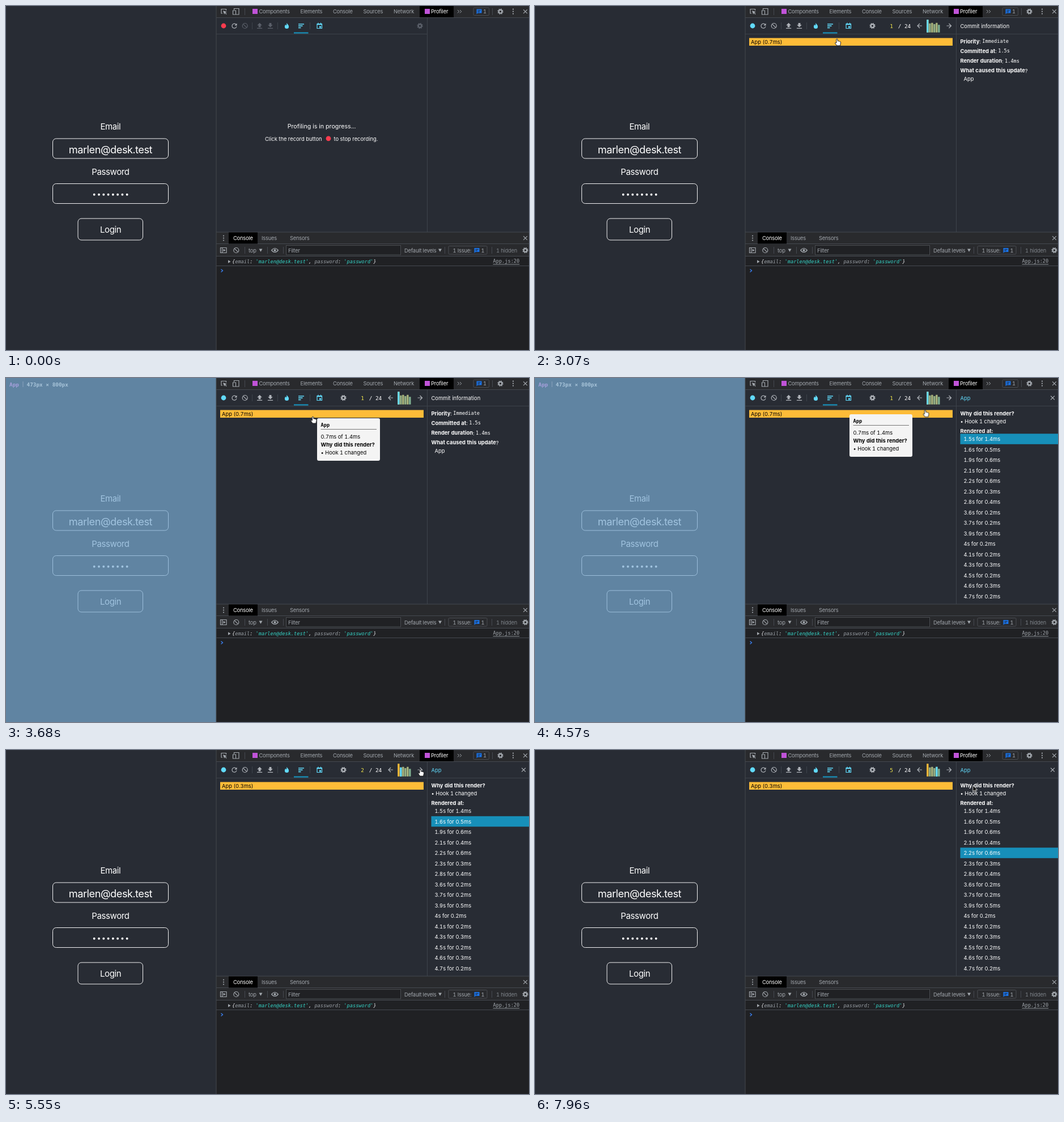
An HTML page for the animation above (8000 ms loop, 923x607 px).

```html
<!DOCTYPE html>
<html lang="en">
<head>
<meta charset="utf-8">
<title>Profiling a login form</title>
<style>
  html, body { margin: 0; width: 100%; height: 100%; overflow: hidden; background: #282c34; }
  svg { display: block; width: 923px; height: 607px; }
  text { font: 9.35px Inter, sans-serif; font-variant-numeric: tabular-nums; dominant-baseline: central; fill: #fff; white-space: pre; }
  .form text { font-size: 15px; letter-spacing: -.025em; text-anchor: middle; }
  .form text.value { font-size: 18.2px; }
  .form rect { fill: none; stroke: #f0f0f1; }
  .chrome text { font-size: 9.3px; letter-spacing: -.02em; fill: #a2a7ad; }
  .chrome text.on { fill: #fff; }
  text.mono, .chrome text.mono, .mono { font-family: "DejaVu Sans Mono", monospace; font-size: 8.63px; font-weight: 400; letter-spacing: 0; }
  text.big { font-size: 9.4px; }
  text.bold { font-weight: 700; }
  text.cyan { fill: #61dafb; }
  .chrome text.log { font-style: italic; fill: #e8eaed; }
  .log .key { fill: #9aa0a6; }
  .log .string { fill: #35d4c7; }
  .ink text { fill: #000; }
  .line { fill: none; stroke: currentColor; stroke-width: 1.2; }
  .fill { fill: currentColor; }
  .rule { stroke: #454950; }
  .grey { color: #a2a7ad; }
  .dim { color: #5b606a; }
  .lit { color: #afb3b9; }
  .blue { color: #61dafb; }
</style>
</head>
<body>
<svg viewBox="0 0 923 607">
  <defs>
    <g id="gear" class="line">
      <circle r="2.8" stroke-width="2.2"/>
      <circle r="4.3" stroke-width="1.7" stroke-dasharray="1.69"/>
    </g>
    <path id="cross" class="line" d="M-3.4-3.4 3.4 3.4M3.4-3.4-3.4 3.4"/>
    <g id="dots" class="fill"><circle cy="-4" r="1.1"/><circle r="1.1"/><circle cy="4" r="1.1"/></g>
    <path id="caret" class="fill" d="M-3-2.4H3L0 2.8Z"/>
    <g id="ban" class="line"><circle r="4.5"/><path d="M-3.2-3.2 3.2 3.2"/></g>
    <path id="thick-arrow" class="fill" d="M0-5.2 4.3-.8H1.9V2.4H-1.9V-.8H-4.3Z"/>
    <g id="reload">
      <path class="line" d="M3.2-2.2A4 4 0 1 0 3.9 1"/>
      <path class="fill" d="M4.5-4.6V-.6H.5Z"/>
    </g>
    <path id="arrow" class="line" d="M-4 0H4M0-4 4 0 0 4"/>
    <g id="note">
      <path fill="#1a73e8" d="M-4.5-4H4.5V3H-2.4L-4.5 5Z"/>
      <path stroke="#202124" d="M-2.6-1.6H2.6M-2.6.8H1"/>
    </g>
    <g id="tools">
      <use href="#ban" x="421.7" y="35"/>
      <use href="#thick-arrow" x="447.6" y="35"/>
      <use href="#thick-arrow" transform="translate(466.5 32.4) scale(1 -1)"/>
      <path class="line" d="M443 39.4H452.2M461.9 39.4H471.1"/>
    </g>
  </defs>

  <rect width="923" height="607" fill="#282c34"/>

  <g class="form">
    <text x="184.4" y="212.5">Email</text>
    <rect x="82.5" y="234" width="204" height="35" rx="6"/>
    <text class="value" x="184.4" y="252.5">marlen@desk.test</text>
    <text x="184.4" y="292.5">Password</text>
    <rect x="82.5" y="313.5" width="204" height="35" rx="6"/>
    <path d="M155.7 332.8H215" stroke="#fff" stroke-width="3.9" stroke-linecap="round" stroke-dasharray="0 8.28"/>
    <rect x="127" y="375" width="114.5" height="38" rx="6"/>
    <text x="184.6" y="394.8">Login</text>
  </g>

  <g data-show="3160 4660">
    <rect width="371" height="607" fill="rgba(120,170,210,.7)"/>
    <text class="mono big" x="6" y="11" style="fill:#a6a0dc;font-weight:700">App</text>
    <path d="M30 6V16" stroke="#8ba6bf"/>
    <text class="mono big" x="36.5" y="11" style="fill:#a9c5da;font-weight:700">473px × 800px</text>
  </g>

  <!-- Top tab bar -->
  <g class="chrome grey">
    <rect x="371" width="552" height="20.5" fill="#292a2d"/>
    <path class="rule" d="M371 20.5H923M421.5 4V16M858.5 4V16"/>
    <path class="line" d="M382 13H380V5.5H388.5V8"/>
    <path class="fill" d="M383 8 390 10.6 387.2 11.5 389.6 14 388.6 15 386.2 12.5 385.2 15Z"/>
    <path class="line" d="M402.5 7V4.5H411V15H406M400.5 8H405.5V15H400.5Z"/>
    <rect x="435" y="5" width="9" height="9" fill="#c053d8"/>
    <text x="446.5" y="9.8">Components</text>
    <text x="519.5" y="9.8">Elements</text>
    <text x="577" y="9.8">Console</text>
    <text x="630.5" y="9.8">Sources</text>
    <text x="684" y="9.8">Network</text>
    <rect x="730" width="60" height="20" fill="#000"/>
    <rect x="739" y="5" width="9" height="9" fill="#c053d8"/>
    <text class="on" x="750" y="9.8">Profiler</text>
    <path class="line" d="M797 7 799.7 9.7 797 12.4M801 7 803.7 9.7 801 12.4" style="stroke-width:1"/>
    <rect x="825" y="3" width="27.5" height="13.5" rx="1.5" fill="none" stroke="#4a4d52"/>
    <use href="#note" x="835" y="9.5"/>
    <text x="842" y="9.8">1</text>
    <use href="#gear" x="872.5" y="9.7"/>
    <use href="#dots" x="895" y="9.7"/>
    <use href="#cross" x="916.5" y="9.7"/>
  </g>

  <!-- Profiler toolbar -->
  <path d="M371 49.5H743.5M743.5 21V399M434.5 29V41M479.5 29V41M536.5 29V41" stroke="#3d424a"/>
  <use href="#reload" class="lit" x="403" y="35"/>
  <g class="blue">
    <path class="fill" transform="translate(495.5 35)" d="M-.3-5C1.3-3 3.7-1.5 3.6 1.5A3.6 3.6 0 0 1-3.6 1.5C-3.6 0-2.8-1.7-2-2.4Q-1.9-.9-1-.8Q.3-2-.3-5Z"/>
    <path class="line" d="M516 32H526M516 35.2H523.5M516 38.4H520.5" style="stroke-width:1.7"/>
    <path class="line" d="M549 31.5H557.5V39.5H549ZM549 32.6H557.5M551 29.5V31M555.5 29.5V31"/>
    <rect class="fill" x="553" y="35.5" width="3" height="3"/>
  </g>
  <rect x="508" y="46.3" width="25.5" height="2.2" fill="#178fb9"/>

  <g data-show="0 2270">
    <circle cx="384" cy="35" r="4.4" fill="#ff3b4e"/>
    <use href="#tools" class="dim"/>
    <use href="#gear" class="dim" x="730.5" y="35"/>
    <text x="557" y="212" text-anchor="middle" style="font-size:10.7px">Profiling is in progress...</text>
    <text x="457" y="234">Click the record button</text>
    <circle cx="569" cy="233.8" r="4.4" fill="#ff3b4e"/>
    <text x="578.5" y="234">to stop recording.</text>
  </g>

  <g data-show="2270 8000">
    <circle cx="384" cy="35" r="4.4" fill="#61dafb"/>
    <g class="lit">
      <use href="#tools"/>
      <use href="#gear" x="595.5" y="35"/>
      <use href="#arrow" transform="translate(679 35) scale(-1 1)"/>
      <use href="#arrow" x="730.5" y="35"/>
    </g>
    <path d="M744 49.5H923" stroke="#3d424a"/>
    <text class="mono big" x="640.7" y="35.2">/ 24</text>
    <rect x="378" y="56.5" width="359" height="13.5" fill="#febc38"/>
    <g id="chart"></g>
    <g id="commits"></g>
  </g>

  <g data-show="2270 3950">
    <text x="750.5" y="35.5">Commit information</text>
    <text class="bold" x="750.5" y="62">Priority<tspan font-weight="400">: </tspan><tspan class="mono">Immediate</tspan></text>
    <text class="bold" x="750.5" y="79.3">Committed at<tspan font-weight="400">: </tspan><tspan class="mono">1.5s</tspan></text>
    <text class="bold" x="750.5" y="96.5">Render duration<tspan font-weight="400">: </tspan><tspan class="mono">1.4ms</tspan></text>
    <text class="bold" x="750.5" y="113.8">What caused this update<tspan font-weight="400">?</tspan></text>
    <text x="756.5" y="128">App</text>
  </g>

  <g data-show="3950 8000">
    <text class="cyan" x="750.5" y="35.5">App</text>
    <use href="#cross" class="lit" x="913.5" y="35"/>
    <text class="bold" x="750.5" y="62">Why did this render?</text>
    <text x="750.5" y="76.2">• Hook 1 changed</text>
    <text class="bold" x="750.5" y="93.5">Rendered at:</text>
    <g id="selection"></g>
    <g id="renders"></g>
  </g>

  <!-- Console drawer -->
  <g class="chrome grey">
    <rect x="371" y="399" width="552" height="208" fill="#202124"/>
    <rect x="371" y="399" width="552" height="43" fill="#292a2d"/>
    <path class="rule" d="M371 399H923M371 419.5H923M371 441.5H923M371 458.5H923M421.5 425V437M461.5 425V437M489.5 425V437M774.5 425V437M857.5 425V437"/>
    <use href="#dots" x="384" y="409.5"/>
    <rect x="393" y="399.5" width="51" height="20" fill="#000"/>
    <text class="on" x="401" y="409.7">Console</text>
    <text x="451" y="409.7">Issues</text>
    <text x="501" y="409.7">Sensors</text>
    <use href="#cross" x="916.5" y="409.5"/>
    <path class="line" d="M378.5 426.5H389V435.5H378.5ZM381.5 426.5V435.5"/>
    <path class="fill" d="M383.5 428.5 387.5 431 383.5 433.5Z"/>
    <use href="#ban" x="406.3" y="431"/>
    <text x="428" y="431.2">top</text>
    <use href="#caret" x="449.5" y="431"/>
    <path class="line" d="M468.7 431Q474.5 424 480.3 431Q474.5 438 468.7 431Z"/>
    <circle class="fill" cx="474.5" cy="431" r="2"/>
    <rect x="494.5" y="422.5" width="202" height="16.5" fill="#202124" stroke="#494c50"/>
    <text x="498" y="431.2">Filter</text>
    <text x="703" y="431.2">Default levels</text>
    <use href="#caret" x="766" y="431"/>
    <rect x="781" y="423.5" width="68" height="14.5" rx="1.5" fill="none" stroke="#4a4d52"/>
    <text x="788.5" y="431.2">1 Issue:</text>
    <use href="#note" x="831" y="431"/>
    <text x="838.5" y="431.2">1</text>
    <text x="865" y="431.2" style="fill:#7d8288">1 hidden</text>
    <use href="#gear" x="916.5" y="431"/>
    <path class="fill" d="M392 448.3 396.5 451 392 453.7Z"/>
    <text class="mono log" x="399" y="451">{<tspan class="key">email</tspan>: <tspan class="string">'marlen@desk.test'</tspan>, <tspan class="key">password</tspan>: <tspan class="string">'password'</tspan>}</text>
    <text class="mono" x="859.5" y="450.3" text-decoration="underline">App.js:20</text>
    <path d="M379.5 464.5 382.5 467 379.5 469.5" fill="none" stroke="#3b82f6" stroke-width="1.3"/>
  </g>
  <path d="M371 0V607" stroke="#45484d"/>

  <g data-show="3160 4660">
    <g id="tooltip" class="ink">
      <rect width="111" height="75" rx="3" fill="#f4f4f4"/>
      <text class="mono" x="6.5" y="11.5" style="font-weight:700">App</text>
      <path d="M6.5 19.5H105" stroke="#777"/>
      <text x="6.5" y="32.3">0.7ms of 1.4ms</text>
      <text class="bold" x="6.5" y="46.5">Why did this render?</text>
      <text x="6.5" y="60.7">• Hook 1 changed</text>
    </g>
  </g>

  <g id="cursor" stroke-width=".9">
    <path data-show="630 3070 4660 5370 7870 8000" fill="#000" stroke="#fff"
      d="M0 0V11L2.6 8.7 4.3 12.6 6 11.9 4.4 8.1H7.9Z"/>
    <path data-show="3070 4660 5370 7870" fill="#fff" stroke="#111"
      d="M-1.2.8Q0-.8 1.1.8L1.4 4Q2.6 3.2 3.4 4.3Q4.6 3.8 5.2 4.9Q6.8 4.6 6.6 6.6L5.6 12H-.4L-3.4 7.6Q-3.6 5.8-1 7Z"/>
  </g>
</svg>

<script>
const LOOP = 8000, TICK = 90;
const $ = id => document.getElementById(id);

function add(parent, tag, attrs, content = '') {
  const el = document.createElementNS('http://www.w3.org/2000/svg', tag);
  for (const key in attrs) el.setAttribute(key, attrs[key]);
  el.textContent = content;
  return parent.appendChild(el);
}

// [committed at (s), render duration (ms)]
const renders = [
  [1.5, 1.4], [1.6, .5], [1.9, .6], [2.1, .4], [2.2, .6], [2.3, .3], [2.8, .4], [3.6, .2],
  [3.7, .2], [3.9, .5], [4, .2], [4.1, .2], [4.3, .3], [4.5, .2], [4.6, .3], [4.7, .2]
];
const selfTimes = [.7, .3, .4, .2, .3];
const switches = [2270, 5550, 6090, 7070, 7510, LOOP];
const gradient = ['#37afa9', '#63b19e', '#80b393', '#97b488', '#abb67d',
  '#beb771', '#cfb965', '#dfba57', '#efbb49', '#febc38'];

function addBar(parent, i, color) {
  const share = renders[i][1] / renders[0][1];
  const height = 22.5 * Math.cbrt(share);
  add(parent, 'rect', {
    x: 691.2 + 4 * i, y: 46.7 - height, width: 3.3, height,
    fill: color || gradient[Math.round(share * 9)]
  });
}

renders.forEach(([at, took], i) => {
  add($('renders'), 'text', { x: 756.5, y: 107.7 + 18.5 * i }, `${at}s for ${took}ms`);
  if (i < 6) addBar($('chart'), i);
});

selfTimes.forEach((time, i) => {
  const span = { 'data-show': `${switches[i]} ${switches[i + 1]}` };
  const commit = add($('commits'), 'g', span);
  add(commit, 'text', { class: 'mono big', x: 626.3, y: 35.2, style: 'fill:#f2e64b' }, i + 1);
  add(commit, 'text', { x: 381, y: 63.5, style: 'fill:#000' }, `App (${time}ms)`);
  addBar(commit, i, '#61dafb');
  add($('selection'), 'rect', { ...span, x: 750.5, y: 98.3 + 18.5 * i, width: 173, height: 18.5, fill: '#178fb9' });
});

const play = (el, frames) => el.animate(frames, { duration: LOOP, iterations: Infinity });

// Times in data-show alternately reveal and hide the element.
for (const el of document.querySelectorAll('[data-show]')) {
  const frame = (time, opacity) => ({ offset: time / LOOP, opacity, easing: 'step-end' });
  const times = el.dataset.show.split(' ').map(Number);
  const frames = times.map((time, i) => frame(time, 1 - i % 2));
  play(el, times[0] > 0 ? [frame(0, 0), ...frames] : frames);
}

function travel(el, points) {
  const path = [[0, ...points[0].slice(1)], ...points, [LOOP, ...points.at(-1).slice(1)]];
  play(el, path.map(([t, x, y], i) => {
    const gap = (path[i + 1]?.[0] ?? LOOP) - t;
    return { offset: t / LOOP, transform: `translate(${x}px, ${y}px)`, easing: `steps(${Math.max(1, Math.round(gap / TICK))})` };
  }));
}

travel($('cursor'), [
  [630, 176, 62], [810, 222, 55], [1080, 345, 34], [1170, 369, 28], [1350, 381.5, 32], [1440, 381.5, 34],
  [2720, 381.5, 34], [2810, 396, 36], [2990, 505, 54], [3070, 533, 58], [3250, 539, 64], [3590, 541.5, 68],
  [4220, 541.5, 68], [4310, 553, 67], [4490, 645, 59], [4570, 688.5, 56.5], [4660, 742, 55], [4750, 784, 54],
  [5010, 734, 52], [5190, 732, 54], [5280, 732, 54], [5370, 731, 34],
  [7780, 731, 34], [7870, 752, 50], [7960, 772.7, 62.3]
]);
travel($('tooltip'), [
  [3160, 547, 70], [3250, 549, 71], [4220, 549, 71], [4310, 560, 70], [4400, 598, 67], [4490, 520, 65], [4570, 555, 64]
]);
</script>
</body>
</html>
```
